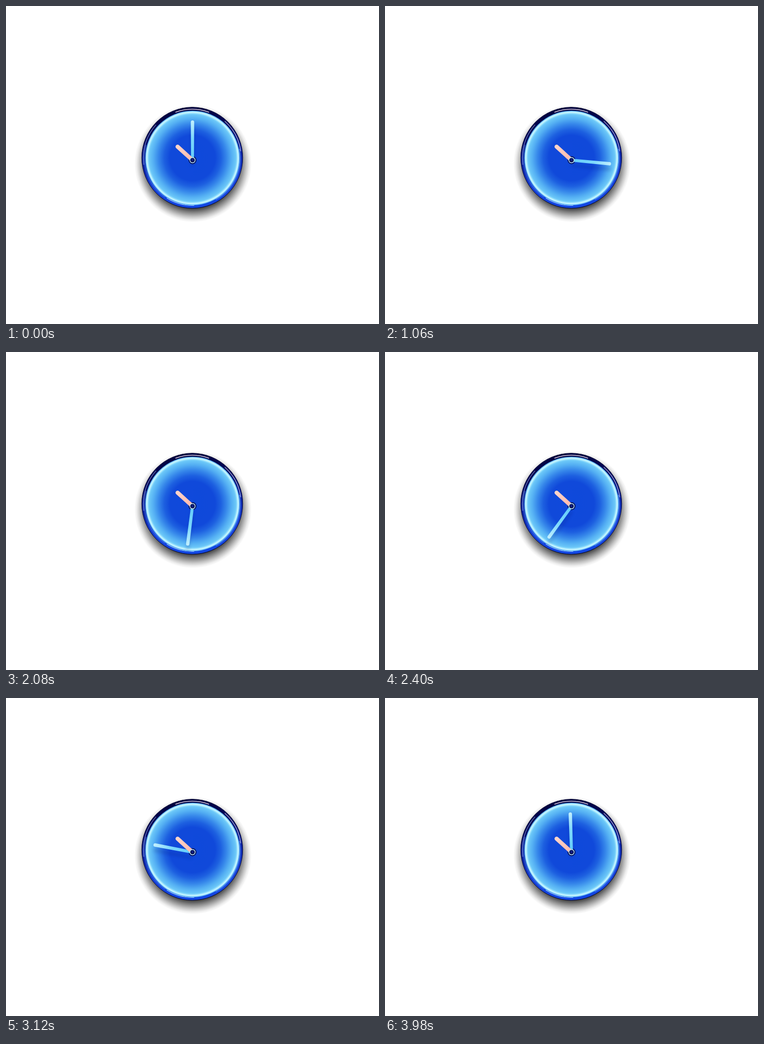
Recreate the animation shown at these times as an HTML page. Size 770 by 656 pixels, loop 4 s.

```html
<!DOCTYPE html>
<html lang="en">
<head>
<meta charset="utf-8">
<title>Clock</title>
<style>
  html, body { margin: 0; width: 100%; height: 100%; overflow: hidden; background: #fff; }
  svg { display: block; width: 100vw; height: 100vh; }
</style>
</head>
<body>
<svg viewBox="0 0 770 656">
  <defs>
    <radialGradient id="shadow" gradientUnits="userSpaceOnUse" cx="386" cy="325" r="121">
      <stop offset=".68" stop-opacity=".92"/>
      <stop offset=".76" stop-opacity=".76"/>
      <stop offset=".83" stop-opacity=".5"/>
      <stop offset=".91" stop-opacity=".22"/>
      <stop offset=".96" stop-opacity=".07"/>
      <stop offset="1" stop-opacity="0"/>
    </radialGradient>
    <linearGradient id="case" x1=".4" y1="0" x2=".55" y2="1">
      <stop offset="0" stop-color="#00003c"/>
      <stop offset=".25" stop-color="#03085c"/>
      <stop offset=".5" stop-color="#0a1f9c"/>
      <stop offset=".75" stop-color="#1540d8"/>
      <stop offset="1" stop-color="#1248e4"/>
    </linearGradient>
    <radialGradient id="face" gradientUnits="userSpaceOnUse" cx="385" cy="313.5" r="97.5">
      <stop offset="0" stop-color="#0f49db"/>
      <stop offset=".48" stop-color="#1049da"/>
      <stop offset=".6" stop-color="#1d60e0"/>
      <stop offset=".72" stop-color="#3687ea"/>
      <stop offset=".83" stop-color="#54aff3"/>
      <stop offset=".92" stop-color="#6cc8f8"/>
      <stop offset=".95" stop-color="#a4e8fe"/>
      <stop offset=".968" stop-color="#d4faff"/>
      <stop offset=".985" stop-color="#84d2fa"/>
      <stop offset="1" stop-color="#489cf0"/>
    </radialGradient>
    <linearGradient id="minuteFill" gradientUnits="userSpaceOnUse" x1="0" y1="0" x2="0" y2="-82">
      <stop offset="0" stop-color="#62ccfb"/>
      <stop offset=".55" stop-color="#7cd8fc"/>
      <stop offset="1" stop-color="#c4f0fe"/>
    </linearGradient>
    <linearGradient id="hourFill" gradientUnits="userSpaceOnUse" x1="0" y1="0" x2="0" y2="-46">
      <stop offset="0" stop-color="#ffb8aa"/>
      <stop offset="1" stop-color="#ffd6cc"/>
    </linearGradient>
    <filter id="soft" filterUnits="userSpaceOnUse" x="270" y="200" width="230" height="230">
      <feGaussianBlur stdDeviation="3"/>
    </filter>
    <path id="minutePath" d="M-3 0L-3.5-78.5A3.5 3.5 0 0 1 3.5-78.5L3 0Z"/>
  </defs>

  <circle cx="386" cy="325" r="121" fill="url(#shadow)"/>

  <circle cx="384.5" cy="313" r="104.2" fill="url(#case)" stroke="#00002e" stroke-width="1"/>
  <g id="glints" fill="none" stroke-linecap="round"></g>
  <circle cx="385" cy="313.5" r="97.5" fill="url(#face)"/>

  <g filter="url(#soft)" opacity=".16">
    <use id="minuteShadow" href="#minutePath" fill="#001060"/>
  </g>
  <circle cx="385" cy="318" r="8.2" fill="#06165e"/>
  <use id="minute" href="#minutePath" fill="url(#minuteFill)"/>
  <path transform="translate(385 318) rotate(-48)" fill="url(#hourFill)"
        d="M-4.2 0V-41.5A4.2 4.2 0 0 1 4.2-41.5V0Z"/>
  <circle cx="385" cy="318" r="5.4" fill="#050c48" stroke="#b6dcf8" stroke-width="1.6"/>
  <circle cx="385" cy="317.6" r="2.6" fill="#0c2088"/>
</svg>
<script>
  const LOOP = 4000, STEP = 20;
  const byId = id => document.getElementById(id);

  // Angles are clockwise degrees from twelve o'clock.
  function addGlint(radius, from, to, color, width, opacity = 1) {
    const point = degrees => {
      const a = degrees * Math.PI / 180;
      return `${384.5 + radius * Math.sin(a)} ${313 - radius * Math.cos(a)}`;
    };
    const arc = document.createElementNS('http://www.w3.org/2000/svg', 'path');
    const attributes = {
      d: `M${point(from)}A${radius} ${radius} 0 0 1 ${point(to)}`,
      stroke: color, 'stroke-width': width, opacity
    };
    for (const name in attributes) arc.setAttribute(name, attributes[name]);
    byId('glints').append(arc);
  }

  addGlint(100, -20, 20, '#f4e8f4', 1.5, .9);
  addGlint(101, 42, 82, '#c8c8ec', 1.5, .8);
  addGlint(99, 80, 150, '#4c86f0', 2.5, .7);
  addGlint(101, 262, 312, '#a8b8ec', 1.2, .7);
  addGlint(99, 215, 285, '#4478ec', 1.6, .7);
  addGlint(98.5, 178, 212, '#b4dcff', 1.2, .9);

  function draw(time) {
    const angle = Math.floor(time % LOOP / STEP) * STEP / LOOP * 360;
    const place = y => `translate(385 ${y}) rotate(${angle})`;
    byId('minute').setAttribute('transform', place(318));
    byId('minuteShadow').setAttribute('transform', place(329));
  }

  const start = performance.now();
  function tick() {
    draw(performance.now() - start);
    requestAnimationFrame(tick);
  }
  tick();
</script>
</body>
</html>
```
